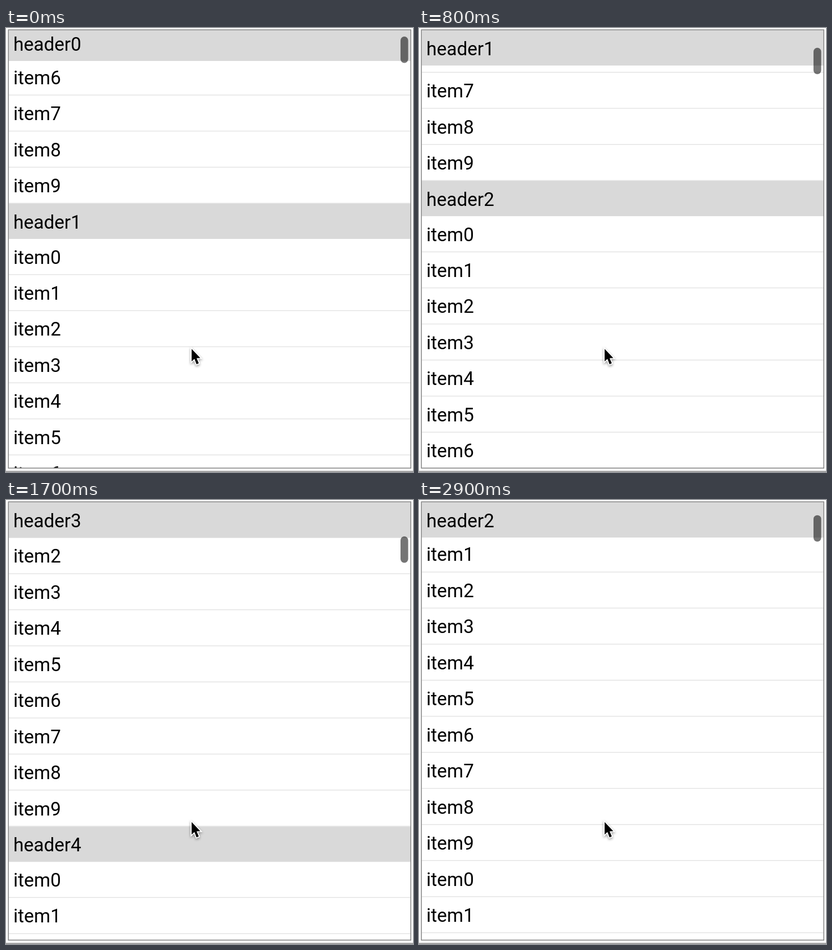
Write an HTML page with a canvas that moves like this. It is 717x781 px and loops after 3000 ms.

```html
<!DOCTYPE html>
<html lang="en">
<head>
<meta charset="utf-8">
<title>Sticky headers</title>
<style>
  html, body { margin: 0; height: 100%; overflow: hidden; background: #fff; }
  canvas { display: block; }
</style>
</head>
<body>
<canvas id="stage" width="717" height="781"></canvas>
<script>
const ctx = document.getElementById('stage').getContext('2d');
const LOOP = 3000, STEP = 100, TURN = 1700;
const LEFT = 5, TOP = 4, WIDTH = 708, HEIGHT = 770;
const HEADER = 62, ITEM = 63.45, SECTION = HEADER + 10 * ITEM;

// Scroll position over time: [ms, px]
const keys = [[0, 391.5], [500, 980], [800, 1128], [1200, 1598],
              [TURN, 2215.5], [2100, 1914], [2900, 824]];
const secants = keys.slice(1).map(([t, y], i) => (y - keys[i][1]) / (t - keys[i][0]));
const slopes = keys.map((_, i) => {
  const a = secants[i - 1] ?? secants[i], b = secants[i] ?? a;
  return a * b > 0 ? 2 * a * b / (a + b) : 0;
});

// Monotone cubic interpolation
function scrollAt(t) {
  let i = 0;
  while (i < keys.length - 2 && t >= keys[i + 1][0]) i++;
  const [t0, y0] = keys[i], [t1, y1] = keys[i + 1];
  const span = t1 - t0, u = (t - t0) / span, v = 1 - u;
  return v * v * (1 + 2 * u) * y0 + u * u * (3 - 2 * u) * y1
       + span * u * v * (v * slopes[i] - u * slopes[i + 1]);
}

function rect(color, x, y, w, h) {
  ctx.fillStyle = color;
  ctx.fillRect(x, y, w, h);
}

function row(label, y, isHeader) {
  if (y < -ITEM || y > HEIGHT) return;
  if (isHeader) rect('#d9d9d9', LEFT, TOP + y, WIDTH, HEADER);
  else rect('#e4e4e4', LEFT, TOP + y + HEADER, WIDTH, ITEM - HEADER);
  ctx.fillStyle = '#000';
  ctx.fillText(label, 13, TOP + y + 43.5);
}

function drawList(t) {
  const scroll = scrollAt(t);
  // Scrolling back, the next section's header stays pinned and leaves its slot
  const stale = t > TURN && scroll < 3 * SECTION;
  const pinned = Math.floor(scroll / SECTION) + (stale ? 1 : 0);

  for (let s = 0; s < 6; s++) {
    const y = s * SECTION - scroll + (stale && s < pinned ? HEADER : 0);
    if (s !== pinned) row('header' + s, y, true);
    for (let i = 0; i < 10; i++) row('item' + i, y + HEADER + i * ITEM, false);
  }

  const push = stale ? 0 : Math.min(pinned ? 0 : -8, (pinned + 1) * SECTION - scroll - HEADER);
  row('header' + pinned, push, true);

  ctx.fillStyle = 'rgba(0,0,0,.54)';
  ctx.beginPath();
  ctx.roundRect(695, 4.5 + scroll * 0.02686, 13.5, 46.5, 6.75);
  ctx.fill();
}

function drawCursor(y) {
  ctx.save();
  ctx.translate(327, y);
  const arrow = new Path2D('M0 0V22L5 17.5L8.7 27L12.6 25.3L8.8 16.3L15.3 16Z');
  ctx.shadowColor = 'rgba(0,0,0,.4)';
  ctx.shadowBlur = 4;
  ctx.shadowOffsetY = 2;
  ctx.strokeStyle = '#fff';
  ctx.lineWidth = 3.5;
  ctx.stroke(arrow);
  ctx.shadowColor = 'transparent';
  ctx.fillStyle = '#000';
  ctx.fill(arrow);
  ctx.restore();
}

function draw(now) {
  const t = Math.floor(now % LOOP / STEP) * STEP;
  rect('#fff', 0, 0, 717, 781);
  ctx.font = '33px Roboto, sans-serif';

  ctx.save();
  ctx.beginPath();
  ctx.rect(LEFT, TOP, WIDTH, HEIGHT);
  ctx.clip();
  drawList(t);
  ctx.restore();

  ctx.strokeStyle = '#8c8c8c';
  ctx.lineWidth = 1.6;
  ctx.strokeRect(4.2, 3.2, 709, 771);
  rect('#8c8c8c', 0, 779, 717, 1.6);
  drawCursor(t < TURN ? 564.5 : 566.5);
  requestAnimationFrame(draw);
}
requestAnimationFrame(draw);
</script>
</body>
</html>
```
